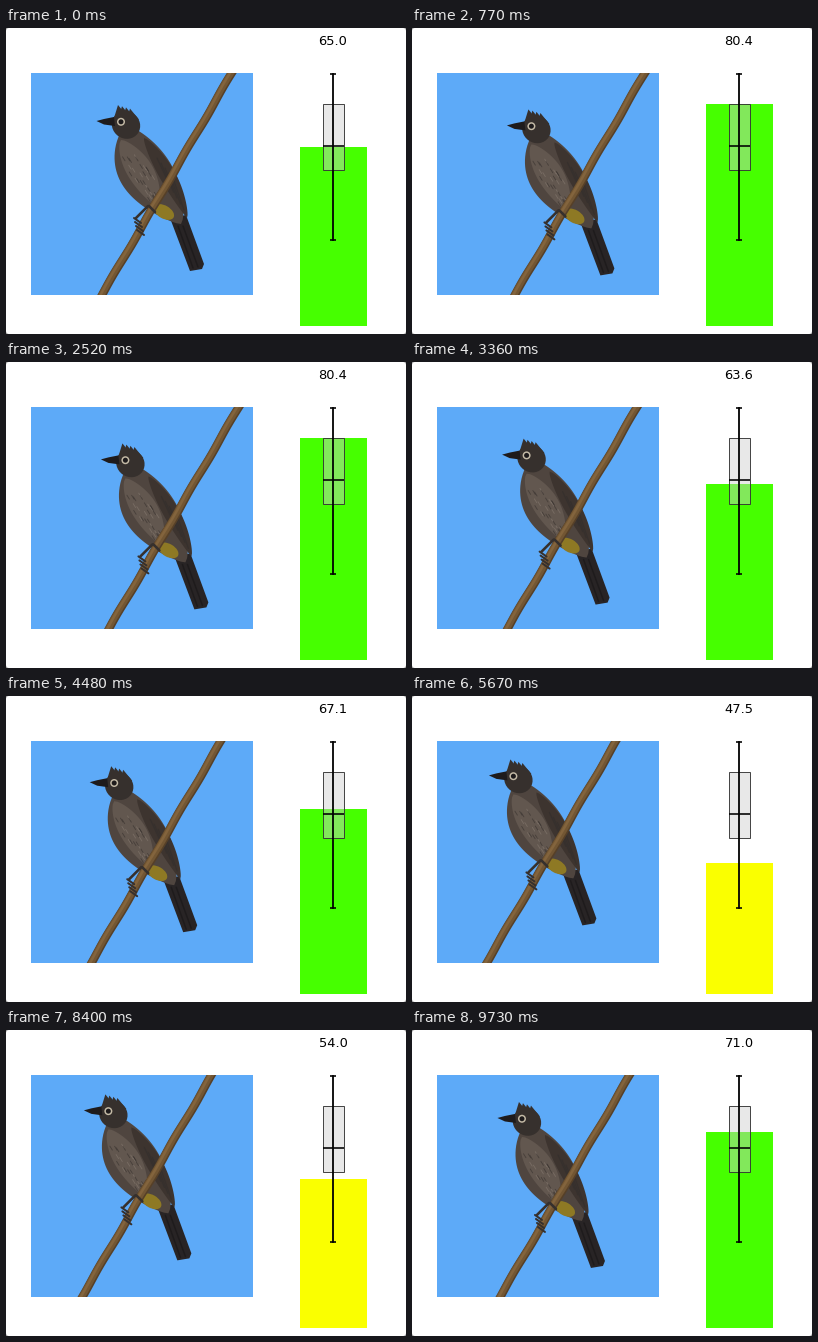
These frames come from a looping animation (400x306 px, 9800 ms). A matplotlib script:

```python
import numpy as np
import matplotlib.pyplot as plt
from matplotlib.animation import FuncAnimation
from matplotlib.collections import LineCollection
from matplotlib.patches import Ellipse, FancyBboxPatch, Polygon, Rectangle
from matplotlib.transforms import Affine2D

W, H, DPI = 400, 306, 100
FRAMES, INTERVAL = 140, 70
PX = 72 / DPI  # points per pixel

# Diagonal drift of the photo: a triangle wave, in pixels
RATE, PEAK, HALF = 0.4, 23.5, 75.8

# (drift, score) turning points
KEYS = [(-19.44, 58.3), (-16.6, 31), (-13.6, 47.5), (-12.64, 54),
        (-5.04, 71), (-0.4, 63.6), (7.43, 91), (8.8, 86.9)]

BASE_Y, SCALE, LOW = 298, 2.76, 56
GREEN, YELLOW = "#46ff00", "#faff00"


def rgb(r, g, b):
    return r / 255, g / 255, b / 255


SKY = rgb(93, 170, 248)
BLACK, DARK, BROWN = rgb(30, 27, 28), rgb(54, 48, 45), rgb(79, 69, 63)
PALE, WING, TAIL = rgb(98, 87, 79), rgb(61, 52, 47), rgb(40, 36, 37)
GOLD, RING = rgb(142, 121, 36), rgb(196, 186, 166)

fig = plt.figure(figsize=(W / DPI, H / DPI), dpi=DPI, facecolor="0.6")
ax = fig.add_axes([0, 0, 1, 1])
ax.set_xlim(0, W)
ax.set_ylim(H, 0)
ax.axis("off")
ax.add_patch(FancyBboxPatch((3, 3), W - 6, H - 6, fc="white", ec="none",
                            boxstyle="round,pad=3,rounding_size=3"))
photo = Rectangle((24.5, 44.5), 222, 222, fc=SKY, ec="none")
ax.add_patch(photo)
shift = Affine2D()


def place(artist):
    """Add to the photo: moves with the drift, clipped to the frame."""
    artist.set_transform(shift + ax.transData)
    artist.set_zorder(2)
    ax.add_artist(artist)
    artist.set_clip_path(photo)


def polygon(points, color):
    place(Polygon(points, fc=color, ec="none"))


def oval(x, y, w, h, color, angle=0):
    place(Ellipse((x, y), w, h, angle=angle, fc=color, ec="none"))


def strokes(lines, color, width, alpha=1):
    place(LineCollection(lines, colors=[color], linewidths=width * PX,
                         alpha=alpha, capstyle="round"))


def leaf(a, b, left, right, color):
    """Rounded shape from a to b, bulging left and right of its axis."""
    a, b = np.array(a, float), np.array(b, float)
    dx, dy = (b - a) / np.hypot(*(b - a))
    t = np.linspace(0, 1, 40)[:, None]
    axis, normal = a + t * (b - a), np.array([dy, -dx])
    front = left * np.abs(np.sin(np.pi * t ** 0.8)) ** 0.8
    back = right * np.abs(np.sin(np.pi * t)) ** 0.7
    polygon(np.vstack([axis - front * normal,
                       (axis + back * normal)[::-1]]), color)


def draw_bird():
    polygon([(164, 190), (180, 187), (198, 236), (196, 241), (184, 243)],
            TAIL)
    strokes([[(172 + 5 * i, 198), (187 + 5 * i, 240 - i)] for i in range(2)],
            BLACK, 1.5)

    leaf((120, 98), (175, 196), 32, 20.5, BROWN)
    leaf((115, 112), (152, 180), 11, 15, PALE)
    oval(158, 184, 22, 13, GOLD, 30)
    leaf((138, 110), (181, 190), 5, 11, WING)
    strokes([[(151 + 4 * i, 130 + 5 * i), (164 + 3.5 * i, 158 + 6 * i)]
             for i in range(5)], DARK, 1.2)

    # feather flecks
    rng = np.random.default_rng(4)
    along, side = rng.random(36), rng.uniform(-9, 9, 36)
    x, y = 118 + 32 * along + side * 0.8, 122 + 46 * along - side * 0.6
    flecks = [[(u, v), (u + 2.5, v + 4)] for u, v in zip(x, y)]
    strokes(flecks[::2], rgb(140, 128, 118), 0.9, 0.5)
    strokes(flecks[1::2], DARK, 0.9, 0.6)

    # head, crest, beak and eye
    oval(120, 97, 29, 27, DARK, 35)
    for i in range(4):
        x, y = 112 + 4 * i, 77 + 1.2 * i
        polygon([(x, y), (x + 9, y + 11), (x - 4, y + 13)], DARK)
    polygon([(90.5, 93), (98, 91), (108, 89), (109, 98), (98, 96.5)], BLACK)
    oval(115, 93.8, 8, 8, RING)
    oval(115, 93.8, 5, 5, BLACK)


def draw_branch():
    t = np.linspace(0, 1, 60)
    y = 10 + 285 * t
    x = 226.5 - (y - 44) * 130 / 222 + 0.5 * np.sin(9 * np.pi * t)
    for offset, width, color in [(0, 8.4, rgb(86, 64, 40)),
                                 (-0.5, 6.4, rgb(114, 86, 51)),
                                 (-1.2, 2.6, rgb(131, 100, 61))]:
        strokes([np.column_stack([x + offset, y + offset * 0.6])],
                color, width)


def draw_feet():
    strokes([[(142, 178), (130, 190)], [(143, 178), (149, 184)]], DARK, 2.6)
    strokes([[(128 + i, 190 + 4 * i), (135 + i, 195 + 4 * i)]
             for i in range(4)], DARK, 2)


draw_bird()
draw_branch()
draw_feet()

# --- score bar and box plot ---
bar = Rectangle((294, BASE_Y), 66.5, 0, ec="none", zorder=2)
ax.add_patch(bar)
ax.add_patch(Rectangle((316.5, 76), 21, 66.3, fc=(0.8, 0.8, 0.8, 0.45),
                       ec=(0.2, 0.2, 0.2, 0.9), lw=PX, zorder=3))
ax.plot([327, 327], [46, 212], color="black", lw=1.8 * PX, zorder=4)
for y, half in [(46, 3), (118.4, 10.5), (212, 3)]:
    ax.plot([327 - half, 327 + half], [y, y], color="black", lw=1.6 * PX,
            solid_capstyle="butt", zorder=4)
label = ax.text(327, 17.3, "", ha="center", va="baseline", color="black",
                family="DejaVu Sans", fontsize=13 * PX, zorder=5)


def drift(frame):
    phase = (frame - PEAK) % (2 * HALF)
    return RATE * (PEAK - min(phase, 2 * HALF - phase))


def update(frame):
    d = drift(frame)
    score = np.interp(d, *zip(*KEYS))
    shift.clear().translate(d, d)
    bar.set_height(-score * SCALE)
    bar.set_facecolor(GREEN if score >= LOW else YELLOW)
    label.set_text(f"{score:.1f}")
    return bar, label


anim = FuncAnimation(fig, update, frames=FRAMES, interval=INTERVAL,
                     repeat=True, repeat_delay=0, blit=False)
plt.show()
```
